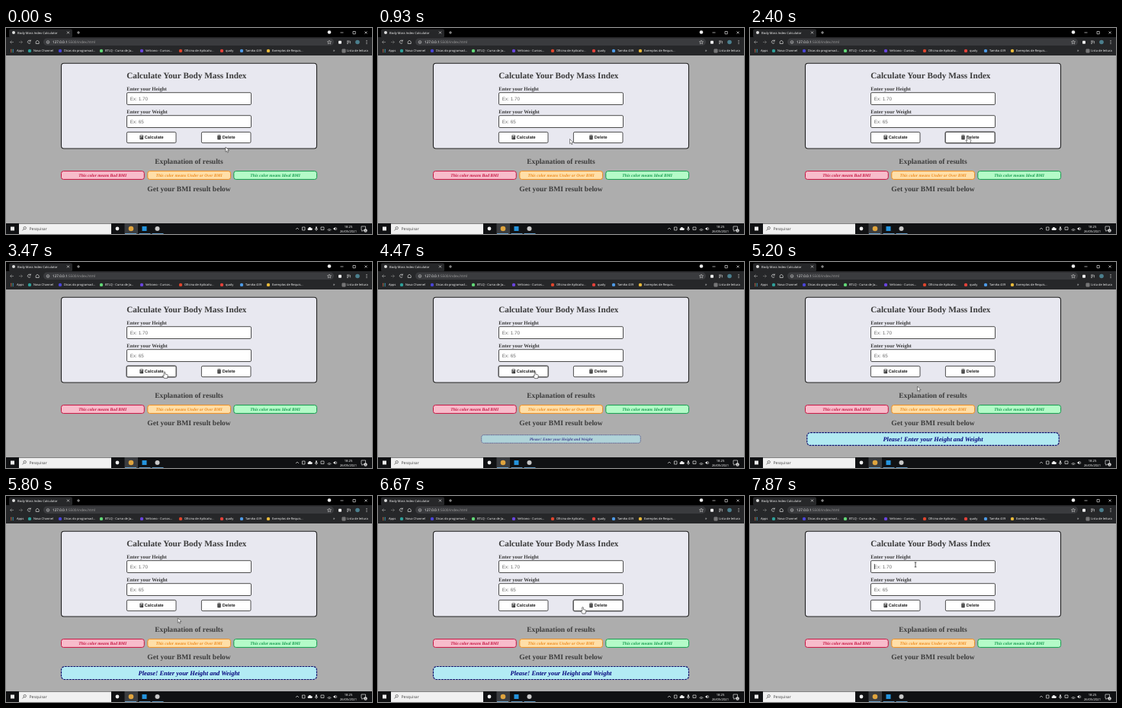
Recreate the animation shown at these times as an HTML page. Size 480 px wide and 270 px high, loop 8 s.

```html
<!DOCTYPE html>
<html lang="en">
<head>
<meta charset="utf-8">
<title>Body Mass Index Calculator</title>
<style>
html, body { margin: 0; width: 100%; height: 100%; overflow: hidden; background: #adadad; }
svg { display: block; width: 480px; height: 270px; }
text { white-space: pre; text-rendering: geometricPrecision; }
.ui { font-family: "Open Sans", "Noto Sans", sans-serif; }
.serif { font-family: "Liberation Serif", "Times New Roman", serif; font-weight: bold; }
.sans { font-family: "Liberation Sans", Arial, sans-serif; }
.it { font-style: italic; }
.bold { font-weight: bold; }
.mid { text-anchor: middle; }
</style>
</head>
<body>
<svg id="stage" viewBox="0 0 480 270">
  <g id="browser"></g>
  <g id="page"></g>
  <g id="taskbar"></g>
  <g id="result"></g>
  <path id="caret" d="M163.3 89V96" stroke="#111" stroke-width=".7"/>
  <g id="cursor">
    <path id="arrow" d="M0 0V6.3L1.5 5 2.5 7.3 3.5 6.8 2.6 4.6H4.6Z" fill="#fff" stroke="#222" stroke-width=".5"/>
    <path id="hand" d="M-.8 .6Q0-.5 .8 .6V3.2L3.7 3.9Q4.5 4.2 4.3 5.2L3.6 8.6H-.5L-2.6 5.4Q-2.4 4.4-.8 5.5Z" fill="#fff" stroke="#222" stroke-width=".6"/>
    <path id="beam" d="M-1.3-3H1.3M0-3V3M-1.3 3H1.3" fill="none" stroke="#111" stroke-width=".7"/>
  </g>
</svg>
<script>
const LOOP = 8000;
const $ = id => document.getElementById(id);

function add(parent, tag, attrs, content) {
  const el = document.createElementNS("http://www.w3.org/2000/svg", tag);
  for (const k in attrs) el.setAttribute(k, attrs[k]);
  if (content) el.textContent = content;
  return parent.appendChild(el);
}
const rect = (p, x, y, width, height, fill, more) => add(p, "rect", { x, y, width, height, fill, ...more });
const dot = (p, cx, cy, r, fill, more) => add(p, "circle", { cx, cy, r, fill, ...more });
const path = (p, d, more) => add(p, "path", { d, fill: "none", stroke: "#ddd", "stroke-width": .7, ...more });
const text = (p, x, y, size, fill, cls, s) => add(p, "text", { x, y, "font-size": size, fill, class: cls }, s);

function drawBrowser() {
  const g = $("browser"), bar = "#262729";
  rect(g, 0, 0, 480, 37, bar);
  rect(g, 0, 0, 480, 12, "#000");
  rect(g, 4, 1.5, 83, 11, bar, { rx: 2 });
  dot(g, 10, 6, 2, "#ddd");
  text(g, 15, 7.6, 4.1, "#fff", "ui", "Body Mass Index Calculator");
  path(g, "M80 4.5l3 3m0-3l-3 3M93 6h4m-2-2v4M438.5 6h4M455 4.5h3.3v3.3h-3.3zM470.5 4.5l3 3m0-3l-3 3");
  dot(g, 424, 5.5, 2.3, "#eee");

  rect(g, 49, 13.5, 381, 9.5, "#3a3b3e", { rx: 4.7 });
  path(g, "M10 18.5H5.5l2-2m-2 2l2 2", { stroke: "#999" });
  path(g, "M17 18.5h4.5l-2-2m2 2l-2 2", { stroke: "#777" });
  path(g, "M32 17a2 2 0 1 0 .2 2.2M32.3 15.5V17.2H30.5M39.2 20.5v-2.5l2-2 2 2v2.5z");
  dot(g, 55, 18.5, 1.8, "none", { stroke: "#ddd", "stroke-width": .6 });
  path(g, "M55 18.2v1.2");
  const url = text(g, 61, 20.1, 4.65, "#a0a0a0", "ui", "");
  add(url, "tspan", { fill: "#fff" }, "127.0.0.1");
  add(url, "tspan", {}, ":5500/index.html");
  path(g, "M424 16l.7 1.7 1.9.1-1.5 1.2.6 1.9-1.7-1.1-1.7 1.1.6-1.9-1.5-1.2 1.9-.1z", { "stroke-width": .5 });
  rect(g, 436, 16.7, 4, 4, "#eee", { rx: .8 });
  path(g, "M447 17h3.5M447 18.7h3M447 20.4h2M451.3 17v3.4");
  dot(g, 461, 18.5, 2.8, "#4b7f8d");
  for (const y of [16.5, 18.5, 20.5]) dot(g, 473, y, .6, "#eee");

  const colors = ["#e8554a", "#4caf62", "#438ce0"];
  for (let i = 0; i < 9; i++)
    rect(g, 6 + i % 3 * 1.5, 27.8 + (i / 3 | 0) * 1.5, 1, 1, colors[i % 3]);
  text(g, 14, 31.3, 4, "#fff", "ui", "Apps");
  [
    [31, "Nova Channel", "#2fa09a"], [71, "Dicas do programad...", "#4a45d8"],
    [125, "BTLQ - Curso de Ja...", "#62d977"], [178, "Veltrano - Cursos...", "#6a45e0"],
    [229, "Oficina de Aplicativ...", "#e0452d"], [283, "quoly", "#e4423a"],
    [309, "Tamiko 439", "#4d9be8"], [344, "Exemplos de Requis...", "#e9ba3b"]
  ].forEach(([x, name, color]) => {
    dot(g, x, 29.9, 2.2, color);
    text(g, x + 5, 31.3, 4, "#fff", "ui", name);
  });
  text(g, 429, 31.4, 5, "#eee", "ui", "»");
  path(g, "M441 28h4v4h-4zM441 30h4M443 28v4", { "stroke-width": .5 });
  text(g, 447.3, 31.3, 4, "#fff", "ui", "Lista de leitura");
}

function button(p, x, label, tx) {
  const g = add(p, "g", {});
  const glow = rect(g, x - .2, 135.8, 65.8, 15.4, "none", { rx: 2, stroke: "#222", "stroke-opacity": .6, "stroke-width": .9 });
  rect(g, x + .4, 136.4, 64.6, 14.2, "#fff", { rx: 1.7, stroke: "#3c3c3c", "stroke-width": .9 });
  text(g, tx, 145.2, 5.62, "#222", "sans bold", label);
  return { x, glow };
}

function drawPage() {
  const g = $("page"), ink = "#3c3c3c";
  rect(g, 0, 36, 480, 220, "#adadad");
  rect(g, 72.5, 46.3, 335, 111.7, "#e8e8f0", { rx: 3.5, stroke: "#222", "stroke-width": 1.1 });
  text(g, 158.2, 66, 11.24, ink, "serif", "Calculate Your Body Mass Index");
  [[81.5, "Enter your Height", "Ex: 1.70"], [111.5, "Enter your Weight", "Ex: 65"]].forEach(([y, label, hint]) => {
    text(g, 158.2, y, 6.75, ink, "serif", label);
    rect(g, 158.5, y + 3.2, 163, 15.8, "#fff", { rx: 1.4, stroke: "#4c4c4c", "stroke-width": 1 });
    text(g, 162.8, y + 13.2, 6.3, "#6c6c6c", "sans", hint);
  });
  const buttons = [button(g, 158, "Calculate", 181.8), button(g, 256, "Delete", 283.8)];

  rect(g, 175.5, 140.4, 4.6, 5.6, "#222", { rx: .6 });
  rect(g, 176.3, 141.1, 3, 1.2, "#eee");
  for (let i = 0; i < 6; i++) rect(g, 176.3 + i % 3 * 1.2, 143 + (i / 3 | 0) * 1.3, .6, .7, "#eee");
  path(g, "M277 141h5M278.7 140.4h1.6", { stroke: "#222" });
  rect(g, 277.4, 141.8, 4.2, 4.4, "#222", { rx: .5 });
  path(g, "M278.5 142.6v2.8m1-2.8v2.8m1-2.8v2.8", { "stroke-width": .3 });

  text(g, 240, 178.2, 9.56, ink, "serif mid", "Explanation of results");
  [
    [72, "Bad BMI", "#f8bccb", "#c4123f"],
    [185.3, "Under or Over BMI", "#ffdfa8", "#ee8c20"],
    [298.3, "Ideal BMI", "#b4fbc8", "#129a4c"]
  ].forEach(([x, what, bg, color]) => {
    rect(g, x + .5, 187.6, 108.8, 10.8, bg, { rx: 2.8, stroke: color, "stroke-width": 1 });
    text(g, x + 54.8, 195, 5.62, color, "serif it mid", "This color means " + what);
  });
  text(g, 240, 213.7, 9.56, ink, "serif mid", "Get your BMI result below");
  return buttons;
}

function drawResult() {
  const g = $("result");
  rect(g, -167.5, -8.5, 335, 17, "#b2ebf4", { rx: 4.5, stroke: "#10106e", "stroke-width": 1.2, "stroke-dasharray": "2.8 1" });
  text(g, 0, 2.8, 8.43, "#00007c", "serif it mid", "Please! Enter your Height and Weight");
}

function drawTaskbar() {
  const g = $("taskbar"), solid = { fill: "#eee", stroke: "none" };
  rect(g, 0, 256, 480, 14, "#101113");
  rect(g, 6, 260.5, 5, 5, "#eee");
  rect(g, 17, 256.5, 121, 13.5, "#f1f1f1");
  dot(g, 24.7, 262.2, 1.7, "none", { stroke: "#333", "stroke-width": .6 });
  path(g, "M23.5 263.4l-2 2", { stroke: "#333" });
  text(g, 30.5, 265, 5.1, "#444", "ui", "Pesquisar");
  dot(g, 146, 263, 2.4, "#eee");
  rect(g, 155.5, 256, 17.5, 14, "#3b3d40");
  dot(g, 164, 263, 3.3, "#dfa43e");
  rect(g, 178.5, 260, 6, 6, "#2493dc");
  dot(g, 198.5, 263, 3, "#c8c8c8");
  for (const x of [156, 174.5, 191.5]) rect(g, x, 269.2, 15, .8, "#76b9ed");

  path(g, "M380 264l2-2 2 2M388.5 261h3.5v4h-3.5zM405.5 263v1h3v-1m-1.5 1v2M413 261h4v3.5h-4zM421.5 264.5a4 4 0 0 1 5 0M422.7 265.7a2 2 0 0 1 2.6 0M432.8 261.3q2 1.7 0 3.7");
  rect(g, 406.2, 260.3, 1.6, 3.2, "#eee", { rx: .8 });
  path(g, "M396.5 265a1.3 1.3 0 0 1 0-2.5 2 2 0 0 1 3.7-.3 1.4 1.4 0 0 1 .6 2.8z", solid);
  path(g, "M429.5 262.3h1l1.5-1.3v4.3l-1.5-1.3h-1z", solid);
  text(g, 449, 261.7, 4.2, "#fff", "ui mid", "18:25");
  text(g, 449, 268, 4.2, "#fff", "ui mid", "26/05/2021");
  path(g, "M466 260h5.5v5h-3l-1.5 1.5v-1.5h-1z");
  dot(g, 471.5, 265.5, 2.2, "#ddd");
  text(g, 471.5, 266.8, 3.5, "#111", "ui mid", "4");
}

// time, x, y of the pointer's hot spot
const KEYS = [
  [0, 288, 156], [70, 288, 156], [330, 285, 143], [470, 285, 143],
  [930, 251.5, 145.5], [1270, 207, 143.5], [1530, 207, 143.5],
  [2270, 285.5, 142], [2400, 285.5, 142], [3200, 214, 143],
  [3600, 206, 144], [4500, 206, 144], [5000, 219, 162],
  [5200, 219.5, 163], [5470, 222, 161], [5670, 222, 161],
  [6470, 268.5, 145.5], [6850, 268.5, 145.5],
  [7330, 234, 138], [7400, 233, 136], [7730, 217, 90], [LOOP, 217, 90]
];

function pointer(t) {
  const i = KEYS.findIndex(k => k[0] > t);
  const [t0, x0, y0] = KEYS[i - 1], [t1, x1, y1] = KEYS[i];
  let u = (t - t0) / (t1 - t0);
  u *= u * (3 - 2 * u);
  return [x0 + (x1 - x0) * u, y0 + (y1 - y0) * u];
}

// CSS "ease": cubic-bezier(.25, .1, .25, 1)
function ease(x) {
  let lo = 0, hi = 1;
  const curve = (a, b, s) => 3 * a * s * (1 - s) ** 2 + 3 * b * s * s * (1 - s) + s ** 3;
  for (let i = 0; i < 20; i++) {
    const m = (lo + hi) / 2;
    if (curve(.25, .25, m) < x) lo = m; else hi = m;
  }
  return curve(.1, 1, lo);
}

const show = (el, on) => el.setAttribute("visibility", on ? "visible" : "hidden");
const within = (v, a, b) => v >= a && v <= b;

drawBrowser();
const buttons = drawPage();
drawTaskbar();
drawResult();

function frame(now) {
  const t = now % LOOP;
  const [x, y] = pointer(t);
  let over = false;
  for (const b of buttons) {
    const hit = within(x, b.x, b.x + 65.5) && within(y, 136, 151);
    show(b.glow, hit);
    over = over || hit;
  }
  const typing = within(x, 158, 322) && (within(y, 84, 101) || within(y, 114, 131));
  show($("hand"), over);
  show($("beam"), typing);
  show($("arrow"), !over && !typing);
  $("cursor").setAttribute("transform", `translate(${x} ${y})`);

  const grow = ease(Math.min(1, Math.max(0, (t - 3930) / 1500)));
  show($("result"), t >= 4200 && t < 6850);
  $("result").setAttribute("transform", `translate(240 232) scale(${grow})`);
  $("result").setAttribute("opacity", grow);
  show($("caret"), t >= 7870);
  requestAnimationFrame(frame);
}
requestAnimationFrame(frame);
</script>
</body>
</html>
```
